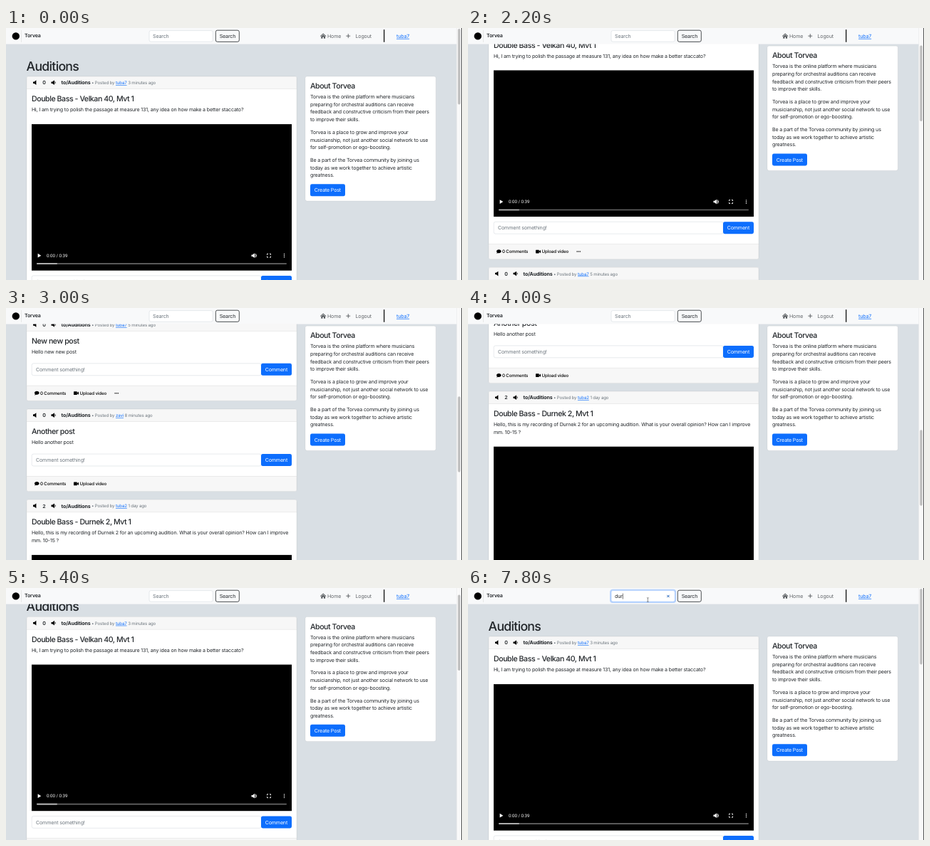
Recreate the animation shown at these times as an HTML page. Size 640x354 px, loop 8000 ms.

```html
<!DOCTYPE html>
<html lang="en">
<head>
<meta charset="utf-8">
<title>Auditions</title>
<style>
html, body { margin: 0; width: 100%; height: 100%; overflow: hidden; background: #d9dfe4; }
svg { display: block; width: 100vw; height: 100vh; }
text { font: 7.08px Inter, sans-serif; letter-spacing: -.022em; fill: #212529; text-rendering: geometricPrecision; white-space: pre; }
.h1 { font-size: 17.7px; font-weight: 500; letter-spacing: -.04em; }
.h4 { font-size: 10.6px; font-weight: 500; letter-spacing: -.042em; }
.bold { font-weight: 700; }
.semi { font-weight: 600; }
.small { font-size: 6.1px; fill: #6c757d; }
.foot { font-size: 6.2px; font-weight: 500; fill: #000; }
.time { font: 6.2px Roboto, sans-serif; letter-spacing: 0; fill: #fff; }
.hint { fill: #6c757d; }
.nav { fill: #62666a; }
.white { fill: #fff; }
.link { fill: #0d6efd; text-decoration: underline; }
</style>
</head>
<body>
<svg id="stage" viewBox="0 0 640 354"></svg>
<script>
const BLUE = '#0d6efd', LOOP = 8000, CARD_TOP = 68, LINE = 10.62, VIDEO_H = 205.6;
const QUERY = 'dur', KEY_TIMES = [7600, 7700, 7790];

const text = (x, y, s, cls = '') => `<text x="${x}" y="${y}" class="${cls}">${s}</text>`;
const rect = (x, y, w, h, fill, extra = '') =>
  `<rect x="${x}" y="${y}" width="${w}" height="${h}" fill="${fill}" ${extra}/>`;
const path = (x, y, d, fill = '#000', extra = '') =>
  `<path transform="translate(${x} ${y})" d="${d}" fill="${fill}" ${extra}/>`;
const line = (x, y, d, color, width) => path(x, y, d, 'none', `stroke="${color}" stroke-width="${width}"`);
const dots = (points, r, fill) => points.map(([x, y]) => `<circle cx="${x}" cy="${y}" r="${r}" fill="${fill}"/>`).join('');
const lines = (x, y, rows) => rows.map((s, i) => text(x, y + i * LINE, s)).join('');
const button = (x, y, w, label) => rect(x, y, w, 17, BLUE, 'rx="2.4"') + text(x + 5.7, y + 11.1, label, 'white');

function speaker(x, y, waves, color = '#000') {
  const arcs = ['M5.2 -1.4q1.3 1.4 0 2.8', 'M5.6 -2.8q3 2.8 0 5.6'].slice(0, waves).join('');
  return path(x, y, 'M0-1.3h1.7l2.7-2.1v6.8L1.7 1.3H0z', color) + line(x, y, arcs, color, .9);
}

function video(y) {
  const c = y + 184.6;
  return rect(36, y, 365, VIDEO_H, '#000') +
    path(44.6, c, 'M0-2.9L4.7 0L0 2.9z', '#fff') +
    text(57, c + 2.2, '0:00 / 0:39', 'time') +
    speaker(344.5, c, 2, '#fff') +
    line(369, c, 'M-2.5-.9v-1.6h1.6M.9-2.5h1.6v1.6M2.5.9v1.6H.9M-.9 2.5h-1.6V.9', '#fff', .9) +
    dots([-2.2, 0, 2.2].map(d => [390.5, c + d]), .7, '#fff') +
    rect(43, y + 195.2, 351, 1.6, '#666', 'rx=".8"') +
    rect(43, y + 195.2, 29, 1.6, '#bbb', 'rx=".8"');
}

function post(top, { votes, user, ago, title, body, clip, own }) {
  const bodyEnd = 49.3 + (body.length - 1) * LINE;
  const field = bodyEnd + (clip ? 17.8 + VIDEO_H + 7.2 : 13.8);
  const foot = field + 31, end = foot + 21.5, mid = foot + 10.8;
  const shell = rect(29, 0, 379, end, '#fff', 'rx="2.4"') +
    rect(29, 0, 379, 17.7, '#f7f7f7', 'rx="2"') + rect(29, 17.4, 379, .5, '#dcdcdc') +
    rect(29, foot, 379, 21.5, '#f7f7f7', 'rx="2"') + rect(29, foot, 379, .5, '#dcdcdc') +
    rect(29, 0, 379, end, 'none', 'rx="2.4" stroke="#000" stroke-opacity=".13" stroke-width=".5"');
  const head = speaker(38, 8.7, 0) + text(51.3, 11.4, votes, 'semi') + speaker(63.5, 8.7, 1) +
    text(77.6, 11.4, 'to/Auditions', 'bold') +
    text(120, 11.2, `• Posted by <tspan class="link">${user}</tspan> ${ago} ago`, 'small');
  const form = rect(36.2, field, 322, 16.9, '#fff', 'rx="2.4" stroke="#ced4da" stroke-width=".5"') +
    text(42, field + 11.1, 'Comment something!', 'hint') + button(358, field, 43, 'Comment');
  const actions =
    path(40, mid, 'M3.3-2.8c1.9 0 3.3 1.1 3.3 2.5S5.2 2.2 3.3 2.2Q2.5 2.2 1.9 2Q1.1 2.8.1 2.8Q.7 2.1.8 1.3Q0 .6 0-.3C0-1.7 1.4-2.8 3.3-2.8z') +
    text(48, mid + 2.3, '0 Comments', 'foot') +
    path(95, mid, 'M.6-2.4h3.6q.6 0 .6.6v3.6q0 .6-.6.6H.6Q0 2.4 0 1.8v-3.6q0-.6.6-.6zM5.1-.8L7-2.1v4.2L5.1.8z') +
    text(103.6, mid + 2.3, 'Upload video', 'foot') +
    (own ? dots([153.1, 155.2, 157.3].map(x => [x, mid]), .75, '#000') : '');
  return `<g transform="translate(0 ${top})">${shell}${head}${text(36, 35.2, title, 'h4')}
    ${lines(36, 49.3, body)}${clip ? video(bodyEnd + 17.8) : ''}${form}${actions}</g>`;
}

const about = rect(420, 0, 183.3, 175, '#fff', 'rx="2.4" stroke="#000" stroke-opacity=".1" stroke-width=".5"') +
  text(427, 17.2, 'About Torvea', 'h4') +
  lines(427, 31.2, ['Torvea is the online platform where musicians', 'preparing for orchestral auditions can receive',
    'feedback and constructive criticism from their peers', 'to improve their skills.']) +
  lines(427, 80.9, ['Torvea is a place to grow and improve your', 'musicianship, not just another social network to use',
    'for self-promotion or ego-boosting.']) +
  lines(427, 120, ['Be a part of the Torvea community by joining us', 'today as we work together to achieve artistic', 'greatness.']) +
  button(427, 151.3, 49, 'Create Post');

const navbar = rect(0, 0, 633, 22.6, '#f8f9fa') +
  '<circle cx="13.8" cy="11.4" r="5.2"/>' + rect(21.3, 3, .5, 17, '#d5d5d5') +
  text(26, 13.2, 'Torvea', 'semi') +
  rect(200, 2.6, 91.2, 17.4, 'none', 'id="glow" rx="3" stroke="#0d6efd" stroke-width="1.8"') +
  rect(201, 3.6, 89.3, 15.6, '#fff', 'id="field" rx="2.4" stroke-width=".5"') +
  text(206, 13.9, '', 'hint').replace('<text', '<text id="query"') +
  rect(0, 7.6, .6, 8, '#222', 'id="caret"') +
  line(281, 11.5, 'M-1.6-1.6L1.6 1.6M1.6-1.6L-1.6 1.6', '#1c5fb8', 1).replace('<path', '<path id="clear"') +
  line(252.4, 16.6, 'M-1.3-3Q0-3 0-2Q0-3 1.3-3M0-2V2M-1.3 3Q0 3 0 2Q0 3 1.3 3', '#444', .6).replace('<path', '<path id="beam"') +
  rect(294.3, 3.2, 33, 16.2, '#f8f9fa', 'rx="2.4" stroke="#212529" stroke-width=".8"') +
  text(299.7, 13.9, 'Search') +
  path(445.2, 11.3, 'M0-3.7L4.2 0L3.6.6L0-2.5L-3.6.6L-4.2 0zM-2.9.8L0-1.7L2.9.8v2.7H.8V1.2H-.8v2.3h-2.1z', '#55595c') +
  text(451, 13.9, 'Home', 'nav') + line(480.3, 11.2, 'M-2.9 0H2.9M0-2.9V2.9', '#55595c', .9) +
  text(490.5, 13.9, 'Logout', 'nav') + rect(530, 2.2, 1.3, 17.6, '#111') +
  text(548, 13.9, 'tuba7', 'link');

const scrollbar = rect(632.6, 0, 6.6, 354, '#fafafa') + rect(632.6, 0, .5, 354, '#e4e4e4') +
  rect(634.2, 0, 3.6, 106.5, '#c1c1c1', 'id="thumb" rx="1.8"') + rect(639.2, 0, .8, 354, '#333');

const posts = [
  [CARD_TOP, { votes: 0, user: 'tuba7', ago: '3 minutes', title: 'Double Bass - Velkan 40, Mvt 1', clip: true, own: true,
    body: ['Hi, I am trying to polish the passage at measure 131, any idea on how make a better staccato?'] }],
  [412, { votes: 0, user: 'tuba7', ago: '5 minutes', title: 'New new post', body: ['Hello new new post'], own: true }],
  [539.2, { votes: 0, user: 'zavi', ago: '8 minutes', title: 'Another post', body: ['Hello another post'] }],
  [666.4, { votes: 2, user: 'tuba2', ago: '1 day', title: 'Double Bass - Durnek 2, Mvt 1', clip: true,
    body: ['Hello, this is my recording of Durnek 2 for an upcoming audition. What is your overall opinion? How can I improve', 'mm. 10-15 ?'] }],
];

const $ = id => document.getElementById(id);
$('stage').innerHTML = rect(0, 0, 640, 354, '#d9dfe4') +
  `<g id="page">${text(28.6, 59.7, 'Auditions', 'h1')}${posts.map(p => post(...p)).join('')}</g>
   <g id="about">${about}</g>${navbar}${scrollbar}`;

// Scroll position over time, joined by a monotone cubic.
const KEYS = [[0, 0], [1330, 0], [2200, 75.5], [2600, 290], [3000, 397.2], [3060, 398], [3200, 398],
  [3550, 500], [4000, 549.4], [4400, 549.4], [5000, 247], [5400, 27.6], [5900, 0], [LOOP, 0]];
const rate = i => (KEYS[i + 1][1] - KEYS[i][1]) / (KEYS[i + 1][0] - KEYS[i][0]);
function slope(i) {
  if (i < 1 || i > KEYS.length - 2) return 0;
  const a = rate(i - 1), b = rate(i);
  return a * b > 0 ? 2 * a * b / (a + b) : 0;
}
function scrollAt(t) {
  const i = KEYS.findIndex((k, n) => t < KEYS[n + 1][0]);
  const [t0, a] = KEYS[i], [t1, b] = KEYS[i + 1], d = t1 - t0, u = (t - t0) / d;
  const ease = u * u * (3 - 2 * u);
  return a + (b - a) * ease + d * u * (1 - u) * (slope(i) * (1 - u) - slope(i + 1) * u);
}

const show = (id, on) => $(id).setAttribute('visibility', on ? 'visible' : 'hidden');

function draw(now) {
  const t = now % LOOP, scroll = scrollAt(t);
  $('page').setAttribute('transform', `translate(0 ${-scroll})`);
  $('about').setAttribute('transform', `translate(0 ${Math.max(25.2, CARD_TOP - scroll)})`);
  $('thumb').setAttribute('y', 1 + scroll * .31);

  const focus = Math.min(1, Math.max(0, (t - 7080) / 150));
  $('glow').setAttribute('stroke-opacity', focus * .28);
  $('field').setAttribute('stroke', focus ? '#86b7fe' : '#ced4da');
  const typed = QUERY.slice(0, KEY_TIMES.filter(k => t >= k).length), query = $('query');
  query.textContent = typed || 'Search';
  query.setAttribute('class', typed ? '' : 'hint');
  $('caret').setAttribute('x', typed ? 206.2 + query.getComputedTextLength() : 206);
  show('caret', focus > 0);
  show('clear', typed);
  show('beam', t >= 6930);
  requestAnimationFrame(draw);
}
requestAnimationFrame(draw);
</script>
</body>
</html>
```
